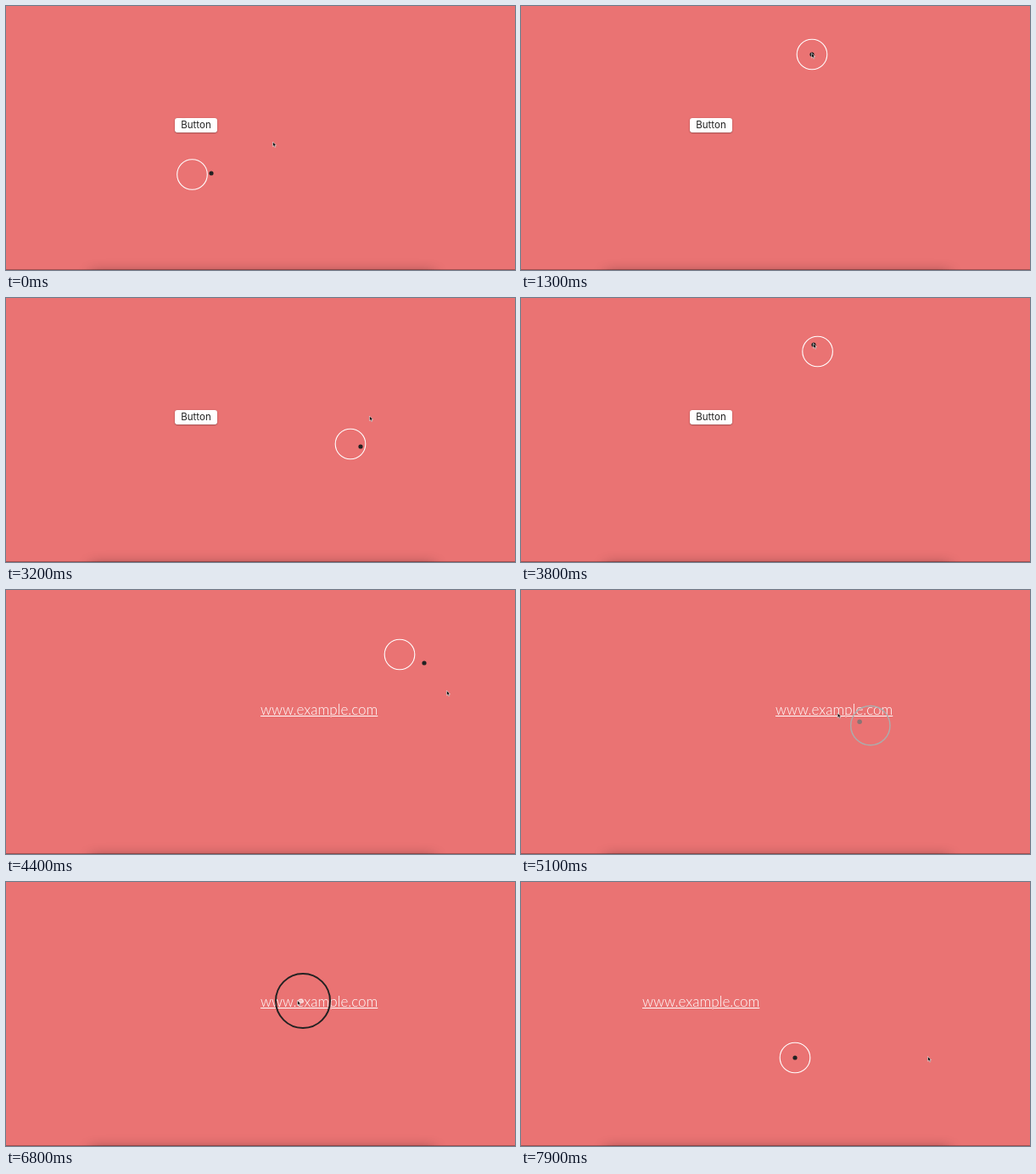
Recreate the animation shown at these times as an HTML page. Size 600x311 px, loop 8 s.

```html
<!DOCTYPE html>
<html lang="en">
<head>
<meta charset="utf-8">
<title>Cursor follower</title>
<style>
  html, body { margin: 0; width: 100%; height: 100%; overflow: hidden; background: #ea7373; }
  #stage { position: relative; width: 600px; height: 311px; overflow: hidden; background: #ea7373; }
  #button, #link { position: absolute; left: 0; white-space: nowrap; will-change: transform; }
  #button {
    top: 132px; width: 50px; height: 17px; border-radius: 3px;
    background: #fff; box-shadow: 0 .5px 1.5px rgba(0, 0, 0, .5);
    color: #222; font: 11.5px/17px Inter, Roboto, sans-serif; text-align: center;
  }
  #link {
    top: 130px; color: #fff; font: 300 17px/21px Lato, sans-serif;
    text-decoration: underline; text-decoration-thickness: 1px; text-underline-offset: 1px;
  }
  #shade {
    position: absolute; left: 100px; top: 315px; width: 405px; height: 20px;
    box-shadow: 0 0 16px rgba(0, 0, 0, .45);
  }
  #edge { position: absolute; left: 0; top: 310px; width: 600px; height: 1px; background: rgba(0, 0, 0, .3); }
  svg { position: absolute; inset: 0; }
</style>
</head>
<body>
<div id="stage">
  <div id="shade"></div>
  <div id="edge"></div>
  <div id="button">Button</div>
  <div id="link">www.example.com</div>
  <svg width="600" height="311">
    <circle id="ring" fill="none"/>
    <circle id="dot"/>
    <path id="arrow" d="M0 0V5.6L1.4 4.5L2.3 6.6L3.3 6.1L2.4 4.1H4.1Z"
          fill="#111" stroke="#fff" stroke-opacity=".75" stroke-width=".7"/>
  </svg>
</div>
<script>
const LOOP = 8000, STEP = 100;       // times below are in units of STEP
const DOT_LAG = 1, RING_LAG = 1.5;
const FIRST = { start: 38, length: 3, by: 300 };
const SECOND = { start: 75, length: 4, by: 157 };

// Pointer route: time, x, y
const route = [
  [-1.5, 219.5, 198.5], [-1, 242, 197], [0, 315, 161.5], [2, 358, 95], [4, 352, 51],
  [8, 343, 57], [13, 343, 57], [14.5, 367, 110], [16, 345, 189], [18, 270, 160],
  [19.5, 240, 137], [26.5, 240, 137], [27.5, 209, 142], [29, 260, 170], [30.5, 406, 172],
  [31, 418, 175], [32, 429, 140.5], [34.5, 368, 95], [37, 345, 55], [41, 345, 55],
  [42.5, 464, 76], [43, 493, 86], [44, 520, 120], [46.5, 490, 165], [48, 450, 173],
  [51.5, 361, 142], [53.5, 404, 147], [55.5, 369.5, 145.5], [57, 350, 151], [61, 348, 134],
  [65, 356, 139], [68, 344, 141], [69.5, 348, 145], [72, 439, 247], [75, 480, 207]
];

const $ = id => document.getElementById(id);
const mix = (a, b, k) => a + (b - a) * k;
const clamp = v => Math.min(1, Math.max(0, v));
const easeOut = k => 1 - (1 - k) ** 2;

function pointer(t) {
  const i = route.findIndex(key => key[0] > t);
  if (i < 0) return route[route.length - 1].slice(1);
  const [t0, x0, y0] = route[Math.max(0, i - 1)], [t1, x1, y1] = route[i];
  const k = clamp((t - t0) / (t1 - t0));
  return [mix(x0, x1, k), mix(y0, y1, k)];
}

const slide = (move, t) => move.by * easeOut(clamp((t - move.start) / move.length));
const scrollAt = t => slide(FIRST, t) + slide(SECOND, t);

// Followers live on the page, and learn of a scroll only once the pointer moves again.
function follow(t, lag) {
  const past = t - lag, [x, y] = pointer(past);
  const known = past > FIRST.start + FIRST.length ? FIRST.by : 0;
  return [x + known - scrollAt(t), y];
}

function isOver(t) {
  const [x, y] = pointer(t), scroll = scrollAt(t);
  const within = (left, width, top, bottom) =>
    x >= left - scroll && x <= left + width - scroll && y >= top && y <= bottom;
  return within(199, 50, 131, 150) || within(600, 137, 129, 152);
}

// Share of the last moments spent over a target
function hoverAt(t) {
  let sum = 0;
  for (let i = 0; i < 8; i++) sum += isOver(t - i / 4);
  return sum / 8;
}

function set(el, attrs) {
  for (const name in attrs) el.setAttribute(name, attrs[name]);
}

function draw(t) {
  const hover = hoverAt(t), scroll = scrollAt(t);
  const [px, py] = pointer(t), [dx, dy] = follow(t, DOT_LAG), [rx, ry] = follow(t, RING_LAG);
  const tone = Math.round(mix(255, 34, hover)), fill = Math.round(mix(34, 255, hover));

  $('button').style.transform = `translateX(${199 - scroll}px)`;
  $('link').style.transform = `translateX(${600 - scroll}px)`;
  set($('ring'), {
    cx: rx, cy: ry, r: mix(17.8, 32, hover),
    stroke: `rgb(${tone},${tone},${tone})`, 'stroke-width': mix(1.1, 2, hover)
  });
  set($('dot'), {
    cx: dx, cy: dy, r: mix(2.6, 3, hover),
    fill: `rgb(${fill},${fill},${fill})`, 'fill-opacity': mix(1, .5, hover)
  });
  set($('arrow'), { transform: `translate(${px - .5} ${py - 1.5})` });
}

const start = performance.now();
function tick() {
  const time = (performance.now() - start) % LOOP;
  draw(Math.floor(time / STEP));
  requestAnimationFrame(tick);
}
tick();
</script>
</body>
</html>
```
